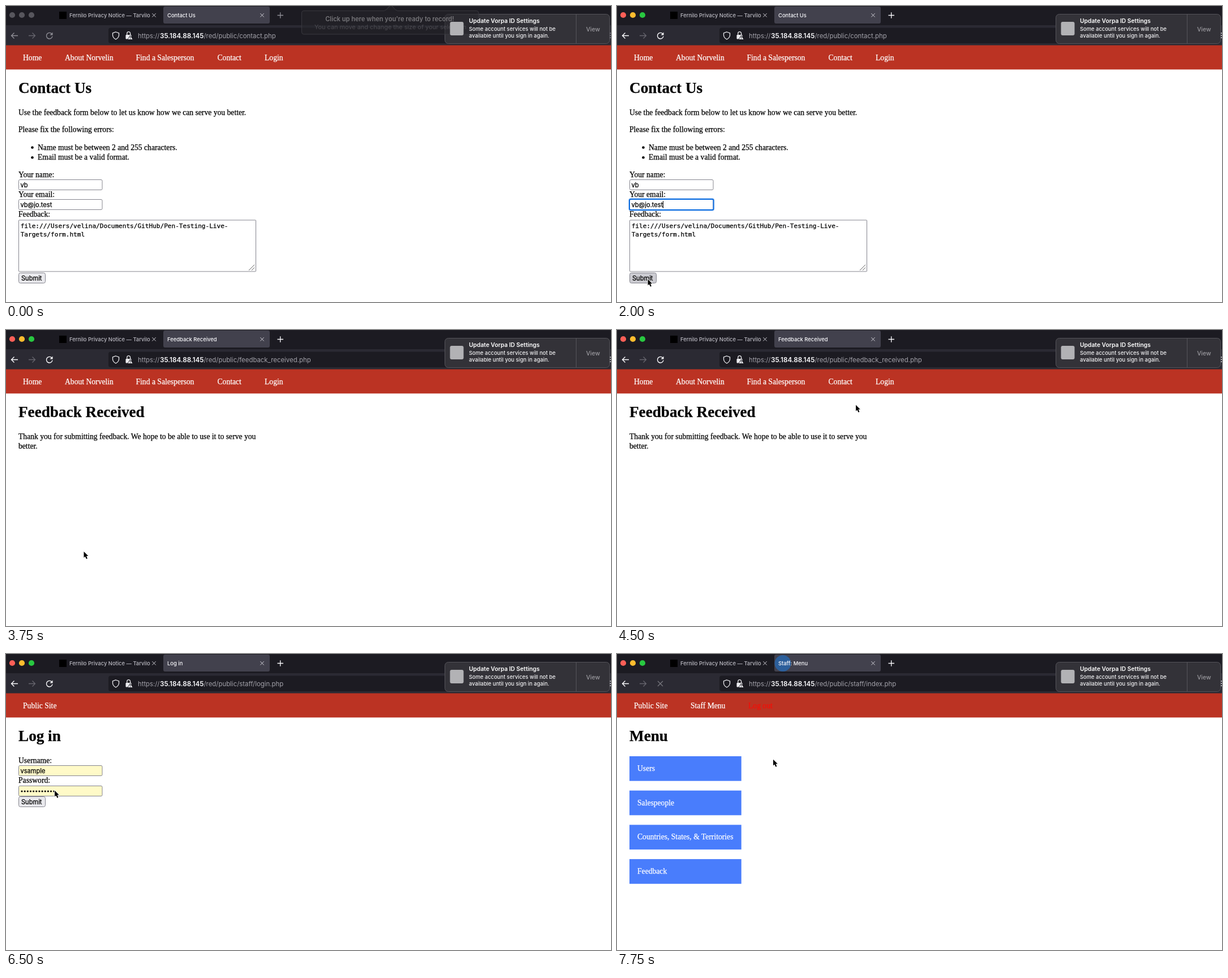
These frames come from a looping animation (1069 by 524 pixels, 8000 ms). An HTML page:

```html
<!DOCTYPE html>
<html lang="en">
<head>
<meta charset="utf-8">
<title>Feedback form</title>
<style>
  html, body { margin: 0; width: 100%; height: 100%; overflow: hidden; background: #fff; }
  svg { display: block; width: 100%; height: 100%; }
  text { white-space: pre; stroke-width: .25; }
  .ui { font-family: Inter, sans-serif; stroke-width: 0; }
  .page { font: 13.63px "Liberation Serif", serif; }
  .h1 { font: bold 27.2px "Liberation Serif", serif; }
  .field { font: 11.1px Inter, sans-serif; }
  .mono { font: 11.08px "DejaVu Sans Mono", monospace; }
</style>
</head>
<body>
<svg id="stage" viewBox="0 0 1069 524"></svg>
<script>
const stage = document.getElementById('stage');
const LOOP = 8000, STEP = 250;

const PAGES = [
  { at: 0, title: 'Contact Us', path: 'contact.php', body: contact, nav: 'public' },
  { at: 3500, title: 'Feedback Received', path: 'feedback_received.php', body: received, nav: 'public' },
  { at: 6250, title: 'Log in', path: 'staff/login.php', body: login, nav: 'login' },
  { at: 7750, title: 'Staff: Menu', path: 'staff/index.php', body: menu, nav: 'staff' }
];
const NAV = {
  public: [[30, 'Home'], [104, 'About Norvelin'], [229.5, 'Find a Salesperson'], [373.5, 'Contact'], [457, 'Login']],
  login: [[30, 'Public Site']],
  staff: [[30, 'Public Site'], [130, 'Staff Menu'], [232, 'Log out', '#f40f08']]
};
const LOADS = [[2500, 3500], [5500, 6250], [7000, 7750]];
// time, x, y of the pointer tip
const POINTER = [
  [250, 690, -8], [500, 540, 110], [750, 310, 290], [1000, 120, 430], [1250, 56, 477], [1500, 54, 483],
  [3500, 54, 483], [4000, 220, 300], [4500, 421.5, 132], [4750, 464, 90.5], [5000, 465, 91],
  [5750, 465, 91], [6250, 180, 212], [6500, 85.5, 241], [7000, 48, 261], [7250, 60, 256], [7750, 275.5, 186]
];

const rect = (x, y, w, h, fill, extra = '') =>
  `<rect x="${x}" y="${y}" width="${w}" height="${h}" fill="${fill}" ${extra}/>`;
const text = (x, y, str, cls = 'page', fill = '#000', extra = '') =>
  `<text x="${x}" y="${y}" class="${cls}" fill="${fill}" stroke="${fill}" ${extra}>${str}</text>`;
const ui = (x, y, str, size, fill, weight = 500, extra = '') =>
  text(x, y, str, 'ui', fill, `font-size="${size}" font-weight="${weight}" ${extra}`);
const line = (d, color, w = 1.2) => `<path d="${d}" fill="none" stroke="${color}" stroke-width="${w}"/>`;
const cross = (x, y, r, color, w = 1) =>
  line(`M${x - r} ${y - r}l${2 * r} ${2 * r}m0 ${-2 * r}l${-2 * r} ${2 * r}`, color, w);

function pointerAt(t) {
  if (t < POINTER[0][0]) return null;
  const i = POINTER.findIndex(p => p[0] > t);
  if (i < 0) return POINTER[POINTER.length - 1].slice(1);
  const [t0, x0, y0] = POINTER[i - 1], [t1, x1, y1] = POINTER[i];
  const k = (t - t0) / (t1 - t0);
  return [x0 + (x1 - x0) * k, y0 + (y1 - y0) * k];
}

function pointer(t) {
  const p = pointerAt(t);
  return p ? `<path transform="translate(${p})" d="M.5 .8V11.6L2.9 9.4L4.9 13.8L6.9 13L5 8.6H8.3Z"
    fill="#000" stroke="#fff" stroke-width="1.8" paint-order="stroke"/>` : '';
}

function field(y, value, fill = '#fff') {
  return rect(22.5, y + .5, 147.5, 18, fill, 'stroke="#85858e" rx="2"') + text(25.5, y + 14, value, 'field');
}

function button(y, hover) {
  return rect(22.5, y + .5, 47, 18, hover ? '#cbcbd1' : '#e9e9ed', 'stroke="#85858e" rx="3"') +
    text(27, y + 13.8, 'Submit', 'field');
}

function contact(t) {
  const focused = t >= 2000 && t < 2500;
  let s = text(22, 193, 'Use the feedback form below to let us know how we can serve you better.') +
    text(22, 223, 'Please fix the following errors:');
  ['Name must be between 2 and 255 characters.', 'Email must be a valid format.'].forEach((msg, i) => {
    const y = 254.5 + 17.8 * i;
    s += `<circle cx="46.5" cy="${y - 4}" r="2.3"/>` + text(56, y, msg);
  });
  s += text(22, 303, 'Your name:') + field(307, 'vb') +
    text(22, 338, 'Your email:') + field(342, 'vb@jo.test') + text(22, 372.5, 'Feedback:');
  if (focused) {
    s += rect(20.5, 340.5, 151.5, 22, 'none', 'stroke="#bcd8f8" rx="3"') +
      rect(22, 342, 148.5, 19, 'none', 'stroke="#0a6be0" stroke-width="2" rx="2"') +
      rect(81, 345, 1, 13, '#000');
  }
  s += rect(22.5, 379, 419, 91, '#fff', 'stroke="#85858e" rx="1"') +
    text(25.7, 393, 'file:///Users/velina/Documents/GitHub/Pen-Testing-Live-', 'mono') +
    text(25.7, 407.7, 'Targets/form.html', 'mono') +
    line('M429 468L439 458M434 468L439 463', '#666', 1);
  return s + button(472, t >= 2000);
}

function received() {
  return text(22, 193, 'Thank you for submitting feedback. We hope to be able to use it to serve you') +
    text(22, 209.5, 'better.');
}

function login(t) {
  let s = text(22, 193, 'Username:') + field(197, 'vsample', '#fffac8') +
    text(22, 228, 'Password:') + field(233, '', '#fffac8');
  for (let i = 0; i < 12; i++) s += `<circle cx="${28 + 5.15 * i}" cy="243" r="1.6"/>`;
  return s + button(252, t === 7000);
}

function menu() {
  return ['Users', 'Salespeople', 'Countries, States, &amp; Territories', 'Feedback'].map((label, i) => {
    const y = 181 + 60.7 * i;
    return rect(22, y, 197.7, 43.7, '#497dfc') + text(36, y + 26, label, 'page', '#fff');
  }).join('');
}

function stopOrReload(t, load, burst, color) {
  if (load && t === load[0]) return line('M72 48L80 56', color, 1.3) + line('M74 50L78 54', color, 1.8);
  if (load) return cross(76.5, 52.5, 4.5, color, 1.4);
  if (burst) return cross(76.5, 52.5, 4.5, '#77767d', 1.3);
  return line('M81.2 49.8A5.3 5.3 0 1 0 82 53.5', color, 1.4) + `<path d="M82.5 46.5V51.5H77.5Z" fill="${color}"/>`;
}

function browser(t, page) {
  const active = t >= 2000;
  const icon = active ? '#fbfbfe' : '#8f8e96';
  const load = LOADS.find(([from, to]) => t >= from && t < to);
  const burst = LOADS.some(([, to]) => t === to);
  let s = rect(0, 0, 1069, 34, '#1c1b22') + rect(0, 34, 1069, 35.5, '#2b2a33');

  ['#fe5f57', '#febc2e', '#28c840'].forEach((c, i) => {
    s += `<circle cx="${11 + 17 * i}" cy="16" r="5.1" fill="${active ? c : '#57565d'}"/>`;
  });
  s += rect(94, 10, 13, 13, '#000') +
    ui(112, 20.3, 'Fernilo Privacy Notice — Tarvilo', 9.4, '#bcbbc3') + cross(261.5, 16.3, 3.2, '#d4d3da');

  s += rect(278, 1, 188, 30, '#42414d', 'rx="3"');
  if (burst) s += '<circle cx="293" cy="16.5" r="14.5" fill="#2c5f9b"/>';
  if (load) {
    const phase = 2 * Math.PI * (t - load[0]) / 1000;
    const cx = 293 - 3 * Math.sin(phase), rx = 1.5 + 1.4 * Math.abs(Math.cos(phase));
    s += `<ellipse cx="${cx}" cy="16.3" rx="${rx}" ry="1.4" fill="#b9b8c0"/>`;
  }
  s += ui(load ? 303 : 285, 20.3, page.title, 9.4, '#fbfbfe') + cross(452.5, 16.3, 3.2, '#d4d3da') +
    line('M479.5 16.5H490M484.7 11.3V21.7', icon, 1.3);

  s += line('M21 52.5H10M14.5 47.5L9.5 52.5L14.5 57.5', icon, 1.4) +
    line('M40 52.5H51M46.5 47.5L51.5 52.5L46.5 57.5', '#66656d', 1.3) +
    stopOrReload(t, load, burst, icon);

  s += rect(181, 38.5, 700, 27.5, '#1c1b22', 'rx="4"') +
    line('M194 46L199.5 48V52Q199 56.5 194 59Q189 56.5 188.5 52V48Z', '#ececf0', 1.3) +
    line('M213.8 51V48.5A2.9 2.9 0 0 1 219.6 48.5V51', '#ececf0', 1.3) +
    rect(211.5, 51, 10, 7.5, '#ececf0', 'rx="1"') +
    '<path d="M219.5 52L224.3 59.5H214.7Z" fill="#ececf0" stroke="#1c1b22" stroke-width=".9"/>' +
    rect(219, 54.3, 1, 2.5, '#1c1b22') + rect(219, 57.4, 1, 1, '#1c1b22') +
    ui(233, 56.7, 'https://', 11.3, '#a3a2aa', 400) +
    ui(272, 56.7, '35.184.88.145', 11.7, '#fbfbfe', 600) +
    ui(349.5, 56.7, '/red/public/' + page.path, 11.4, '#a3a2aa', 400);
  [48, 52, 56].forEach(y => s += rect(1066.5, y - .5, 2.5, 1.2, icon));
  return s;
}

function recordHint(t) {
  const alpha = Math.max(0, 1 - t / 500);
  if (!alpha) return '';
  return `<g opacity="${alpha}">
    <path d="M526 8.5H668Q672 8 676 2L679 -1H681L684 2Q688 8 692 8.5H831Q835 8.5 835 12V46Q835 50 831 50H526Q522.5 50 522.5 46V12Q522.5 8.5 526 8.5Z"
      fill="#26252a" fill-opacity=".55" stroke="#39383e"/>` +
    ui(678, 26.5, "Click up here when you're ready to record!", 11.1, '#77767a', 600, 'text-anchor="middle"') +
    ui(545, 41, 'You can move and change the size of your selection', 10.9, '#4b4a50', 400) + '</g>';
}

function notice(t) {
  return rect(775.5, 14.5, 291, 52, '#333238', 'rx="6" stroke="#55545a"') +
    rect(1007, 15, 1, 51, '#55545a') + recordHint(t) +
    rect(784.5, 28, 24, 24, '#b2b2b5', 'rx="3"') +
    ui(818, 29.7, 'Update Vorpa ID Settings', 10.3, '#fff', 600) +
    ui(818, 44.3, 'Some account services will not be', 9.4, '#f4f4f6') +
    ui(818, 56.3, 'available until you sign in again.', 9.4, '#f4f4f6') +
    ui(1025, 44.5, 'View', 10.4, '#9c9ba0');
}

function draw(t) {
  const page = PAGES.filter(p => p.at <= t).pop();
  const heading = page.title.replace('Staff: ', '');
  stage.innerHTML = rect(0, 0, 1069, 524, '#fff') +
    rect(0, 69, 1069, 43.4, '#bb3323') +
    NAV[page.nav].map(([x, label, color = '#fff']) => text(x, 96, label, 'page', color)).join('') +
    text(22, 154, heading, 'h1') + page.body(t) +
    browser(t, page) + notice(t) + pointer(t);
}

const start = performance.now();
let shown = -1;
function tick() {
  const t = Math.floor((performance.now() - start) % LOOP / STEP) * STEP;
  if (t !== shown) draw(shown = t);
  requestAnimationFrame(tick);
}
tick();
</script>
</body>
</html>
```
